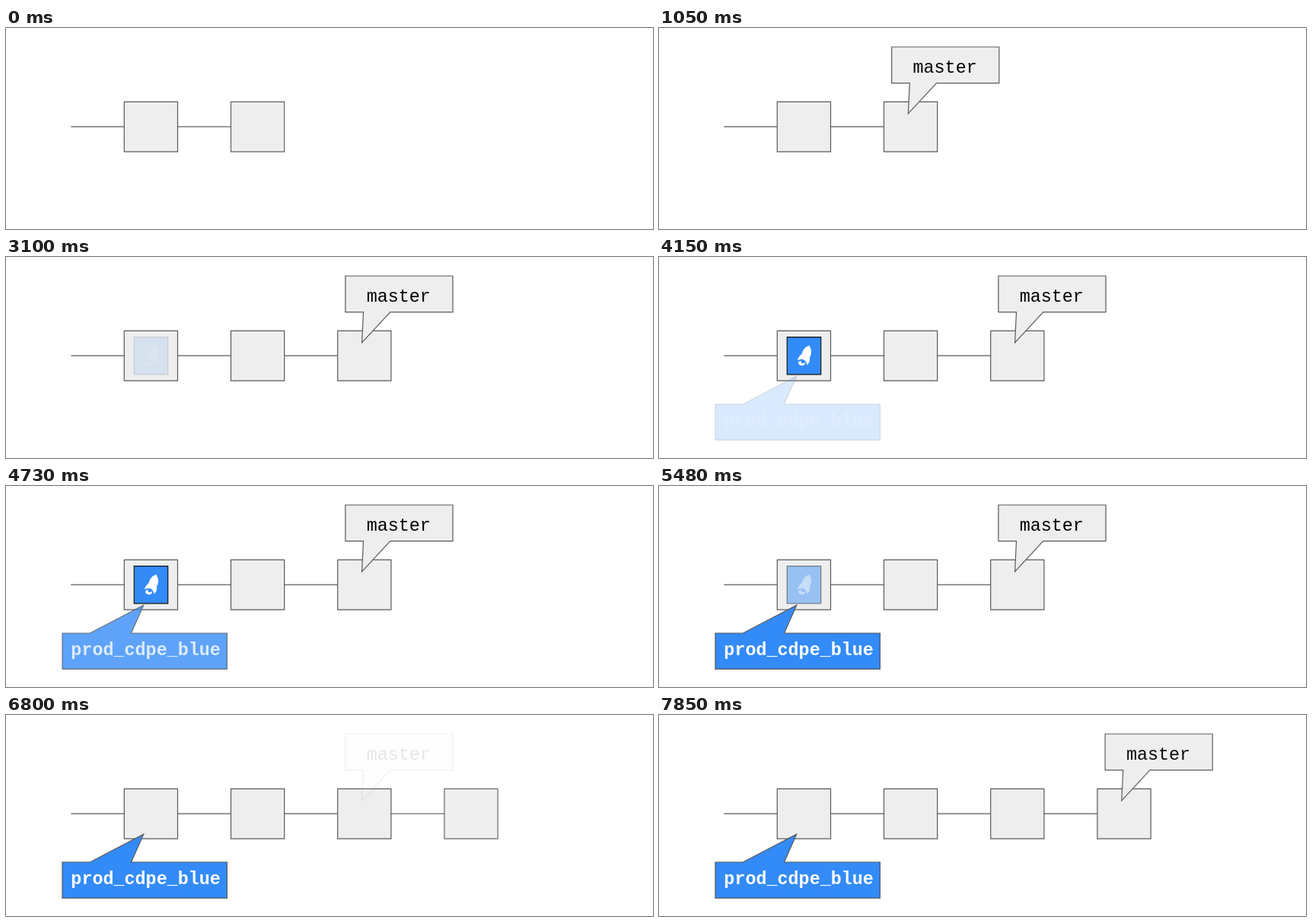
An HTML page with a canvas that plays this animation: 850x265 px, repeating every 8 s.

```html
<!DOCTYPE html>
<html lang="en">
<head>
<meta charset="utf-8">
<title>Commits and deployment tag</title>
<style>
html, body { margin: 0; width: 100%; height: 100%; overflow: hidden; background: #fff; }
canvas { display: block; width: 850px; height: 265px; }
</style>
</head>
<body>
<canvas id="stage"></canvas>
<script>
const W = 850, H = 265, LOOP = 8000, STEPS = 54;
const START = 50, FADE = 980; // back-to-back linear fades
const GREY = '#eeeeee', BLUE = '#338bf8', LINE = '#595959';
const PITCH = 140.2, NODE_X = 155.3, NODE_W = 70.2, NODE_Y = 97.3, NODE_H = 65.8;
const FONT = '"Courier New", "Liberation Mono", monospace';

const canvas = document.getElementById('stage');
const ctx = canvas.getContext('2d');
const dpr = window.devicePixelRatio || 1;
canvas.width = W * dpr;
canvas.height = H * dpr;

const clamp = v => Math.min(1, Math.max(0, v));

function faded(alpha, draw) {
  if (alpha <= 0) return;
  ctx.save();
  ctx.globalAlpha = alpha;
  draw();
  ctx.restore();
}

function polygon(points, fill, stroke = LINE) {
  ctx.beginPath();
  points.forEach(([x, y]) => ctx.lineTo(x, y));
  ctx.closePath();
  ctx.fillStyle = fill;
  ctx.fill();
  ctx.strokeStyle = stroke;
  ctx.lineWidth = 1.2;
  ctx.stroke();
}

function box(x, y, w, h, fill, stroke) {
  polygon([[x, y], [x + w, y], [x + w, y + h], [x, y + h]], fill, stroke);
}

function label(text, x, y, color, weight) {
  ctx.font = `${weight} 23.4px ${FONT}`;
  ctx.textAlign = 'center';
  ctx.fillStyle = color;
  ctx.fillText(text, x, y);
}

function node(i, alpha) {
  faded(alpha, () => {
    const x = NODE_X + i * PITCH, y = 130.2;
    ctx.beginPath();
    ctx.moveTo(x - 70, y);
    ctx.lineTo(x, y);
    ctx.strokeStyle = LINE;
    ctx.lineWidth = 1.2;
    ctx.stroke();
    box(x, NODE_Y, NODE_W, NODE_H, GREY);
  });
}

function branchTag(i, alpha) {
  faded(alpha, () => {
    ctx.translate((i - 2) * PITCH, 0);
    polygon([[445.9, 25], [587, 25], [587, 72.6], [504.8, 72.6],
      [467.6, 113], [469.5, 72.6], [445.9, 72.6]], GREY);
    label('master', 515.8, 59.3, '#000', 'normal');
  });
}

function deployTag(alpha) {
  faded(alpha, () => {
    polygon([[74, 194], [110.3, 194], [180.8, 157.2], [164.5, 194],
      [290.4, 194], [290.4, 241.4], [74, 241.4]], BLUE);
    label('prod_cdpe_blue', 183.6, 222.5, '#fff', 'bold');
  });
}

function rocket(alpha) {
  faded(alpha, () => {
    box(168.3, 105.6, 44.4, 49.2, BLUE, '#111');
    ctx.fillStyle = '#fff';
    ctx.beginPath();
    ctx.moveTo(197.3, 116.5);
    ctx.quadraticCurveTo(189, 120, 187.5, 128);
    ctx.quadraticCurveTo(183, 131, 182, 136.5);
    ctx.quadraticCurveTo(186, 134, 190, 135.3);
    ctx.quadraticCurveTo(194, 137.5, 194.5, 142.5);
    ctx.quadraticCurveTo(199, 138.5, 198, 132.5);
    ctx.quadraticCurveTo(202.5, 125, 197.3, 116.5);
    ctx.fill();
    ctx.beginPath();
    ctx.moveTo(183, 138.5);
    ctx.quadraticCurveTo(183, 143.5, 189.5, 143.2);
    ctx.quadraticCurveTo(192.5, 141.5, 191.8, 138.8);
    ctx.quadraticCurveTo(189.5, 141, 187.2, 139.8);
    ctx.quadraticCurveTo(185.8, 138.5, 187, 136.6);
    ctx.closePath();
    ctx.fill();
  });
}

function render(ms) {
  const step = Math.min(STEPS - 1, Math.floor((ms + 16) * STEPS / LOOP));
  const phase = (step * LOOP / STEPS - START) / FADE;
  const since = n => clamp(phase - n);

  ctx.setTransform(dpr, 0, 0, dpr, 0, 0);
  ctx.fillStyle = '#fff';
  ctx.fillRect(0, 0, W, H);

  node(0, 1);
  node(1, since(-1));
  node(2, since(1));
  node(3, since(6));
  rocket(since(3) - since(5));
  branchTag(1, since(0) - since(1));
  branchTag(2, since(2) - since(6));
  branchTag(3, since(7));
  deployTag(since(4));
}

const origin = performance.now();
function tick() {
  render((performance.now() - origin) % LOOP);
  requestAnimationFrame(tick);
}
tick();
</script>
</body>
</html>
```
